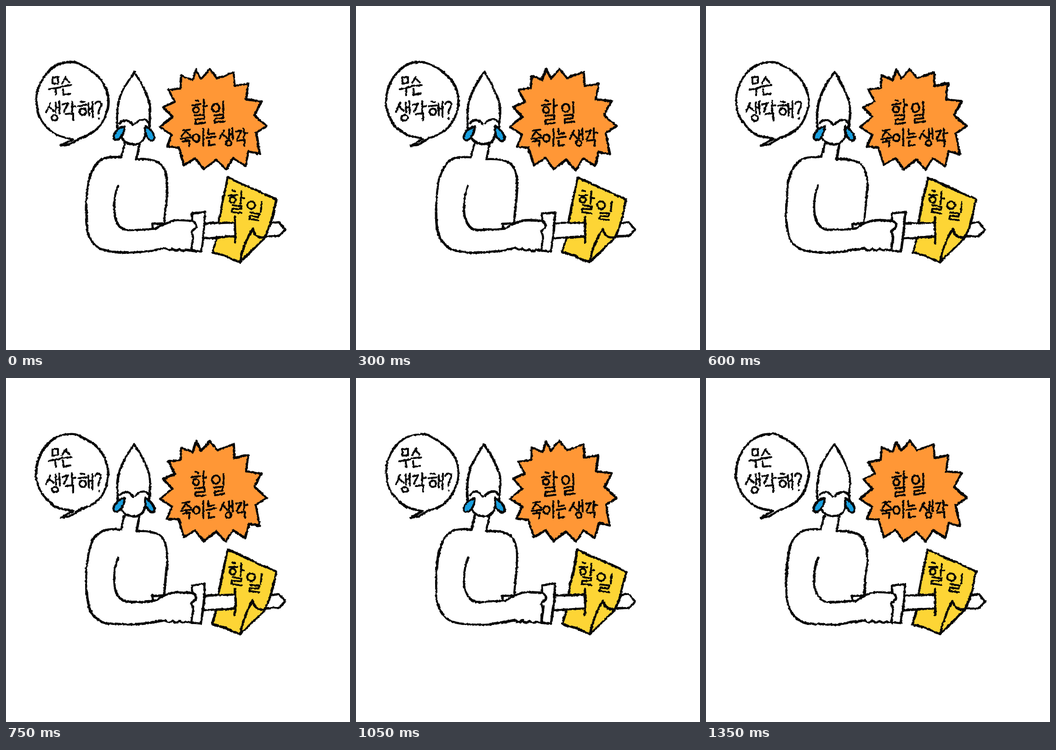
An HTML page for the animation above (1.5 s loop, 748x748 px).

```html
<!DOCTYPE html>
<html lang="ko">
<head>
<meta charset="utf-8">
<title>할 일 죽이는 생각</title>
<style>
  html, body { margin: 0; width: 100%; height: 100%; overflow: hidden; background: #fff; }
  svg { display: block; width: 100vw; height: 100vh; }
  path { stroke: #060606; stroke-linecap: round; stroke-linejoin: round; fill: none; }
</style>
</head>
<body>
<svg viewBox="0 0 748 748" role="img" aria-label="무슨 생각해? 할 일 죽이는 생각. 할 일">
  <filter id="crayon" filterUnits="userSpaceOnUse" x="0" y="0" width="748" height="748" color-interpolation-filters="sRGB">
    <feTurbulence id="sway" type="fractalNoise" baseFrequency="0.03" numOctaves="1" result="slow"/>
    <feTurbulence id="grit" type="fractalNoise" baseFrequency="0.25" numOctaves="1" result="fine"/>
    <feDisplacementMap in="SourceGraphic" in2="slow" scale="3.5" xChannelSelector="R" yChannelSelector="G" result="bent"/>
    <feDisplacementMap in="bent" in2="fine" scale="4" xChannelSelector="G" yChannelSelector="R"/>
    <feGaussianBlur stdDeviation="0.4"/>
  </filter>
  <g id="art" filter="url(#crayon)"></g>
</svg>
<script>
const STEP = 150, STEPS = 10;
const art = document.getElementById('art');
const sway = document.getElementById('sway');
const grit = document.getElementById('grit');
const pressed = [];

function add(d, style = {}) {
  const p = document.createElementNS('http://www.w3.org/2000/svg', 'path');
  p.setAttribute('d', d);
  Object.assign(p.style, { strokeWidth: 4.5, ...style });
  art.append(p);
  return p;
}

// An outline plus broken heavier strokes, like uneven hand pressure.
function ink(d, fill = 'none') {
  add(d, { fill });
  pressed.push(add(d, { strokeWidth: 5.5, strokeDasharray: '55 80 25 110 90 60' }));
}

const patch = (d, fill) => add(d, { fill, stroke: 'none' });
const letter = d => add(d, { strokeWidth: 4.1 });
const ring = (x, y, rx, ry = rx) =>
  `M${x} ${y - ry}a${rx} ${ry} 0 1 0 .1 0z`;

// Speech bubble
ink(`M139 122C112 122 92 138 80 157C68 177 63 200 67 222C71 248 90 270 112 281
  C124 286 136 287 146 289L119 304L137 301L160 287C190 278 205 264 214 245
  C224 224 225 205 220 187C213 160 190 140 165 129C157 123 148 121 139 122Z`, '#fff');

// Burst
const burst = [413,138, 424,158, 443,137, 459,157, 495,144, 497,174, 527,168, 522,203,
  556,207, 540,237, 567,261, 543,276, 552,322, 528,316, 520,348, 494,331, 478,356,
  457,334, 430,355, 412,331, 387,346, 375,308, 350,306, 361,280, 335,263, 362,241,
  342,220, 367,208, 353,182, 380,178, 382,151, 406,161];
ink(`M${burst.join(' ')}Z`, '#ff9736');

// Head
ink('M279 144C262 168 250 188 245 210C241 228 241 245 242 265');
ink('M279 144C295 167 305 188 311 208C315 226 313 245 311 264');
ink('M247 255C252 248 262 246 268 250L276 258');
ink('M281 256C286 248 300 244 306 249L312 256');
ink('M252 287C256 295 266 300 278 301C291 301 301 293 303 278');
ink('M258 262C248 263 237 271 234 283C233 291 240 294 247 288C254 281 258 272 258 262Z', '#189fdf');
ink('M303 261C301 272 304 283 312 290C319 296 324 291 323 284C320 274 312 266 303 261Z', '#189fdf');

// Neck and body
ink(`M258 299C256 310 254 318 250 329C235 328 220 328 209 333C192 343 183 360 179 385
  C175 410 173 440 175 470C177 500 188 522 210 530C235 538 270 537 300 534
  C320 531 335 529 346 526C352 532 358 532 362 527C367 533 372 533 377 528
  C383 533 388 533 391 530L404 532`);
ink('M290 300C288 312 286 322 284 333C305 332 325 335 336 343C349 355 351 375 350 400C349 425 345 450 344 472');
ink('M244 391C236 408 234 430 236 450C238 470 247 484 262 487C285 488 305 486 326 484C340 474 352 468 368 466C382 465 395 467 404 467');
ink('M343 473L318 474L319 483');

// Blade tip, note, blade
ink('M568 473L593 470L607 486L594 500L560 501', '#fff');
ink(`M482 373L588 421C582 448 576 470 572 483L562 505L509 557C495 552 488 550 482 546
  C476 541 467 542 459 538L449 535C452 523 458 511 459 497L462 470L471 425Z`, '#fdd535');
ink('M509 557C513 535 522 505 537 485C540 498 546 505 562 503');
patch('M432 473L498 471L498 501L430 505Z', '#fff');
ink('M433 473L497 471');
ink('M430 505L497 501');
ink('M498 459C497 480 500 497 498 515');

// Guard and hand edge
ink('M405 467L404 451L433 448L430 490L424 534L403 532');
ink('M405 467C412 470 415 477 412 482C408 486 402 488 403 492C408 499 407 508 405 515L403 532');

// Lettering: 무슨 생각해?
letter('M101 155L113 154L113 168L101 169ZM94 181L118 177M108 179L109 194');
letter('M130 154L122 168M130 158L138 166M120 175L142 172M124 181L125 193L140 191');
letter('M96 211L87 231M95 220L104 228M108 210L109 232M109 221L115 220M116 207L117 234' + ring(106, 243, 7, 6));
letter('M123 214L135 211L126 230M144 207L144 231M144 218L152 217M130 235L146 233L146 248');
letter('M163 208L171 209M158 218L175 216M179 212L180 238M180 224L187 223M188 208L188 242' + ring(167, 230, 7));
letter('M194 213C197 206 207 206 207 214C207 223 200 224 201 234M202 244L202.5 245');

// 할 일
letter('M412 205L418 207M404 216L423 213M430 203L430 233M430 217L437 216M411 239L431 237L431 246L412 248L412 257L433 254' + ring(413, 226, 6.5));
letter('M472 208L473 232M453 238L472 236L472 244L454 246L454 254L476 251' + ring(456, 221, 8, 9));

// 죽이는 생각
letter('M384 271L400 269M393 270L383 284M393 275L402 282M381 289L405 286M392 288L392 294M384 295L399 293L398 305');
letter('M429 267L429 304' + ring(414, 287, 7, 8));
letter('M440 267L440 279L453 277M436 287L456 284M441 293L441 304L453 302');
letter('M474 271L465 289M473 279L481 287M485 269L485 288M485 279L491 278M492 266L493 290' + ring(484, 298, 6));
letter('M500 273L511 271L502 289M517 267L517 287M517 277L525 276M503 293L519 291L519 304');

// 할일 on the note
letter('M492 401L498 403M485 411L503 411M512 403L510 430M511 417L518 418M493 433L512 436L511 442L492 441L491 448L512 451' + ring(493, 421, 6.5));
letter('M556 426L554 447M531 449L551 451L549 458L531 456L529 463L550 466' + ring(533, 433, 8.5, 8));

let shown = -1;
function draw() {
  const step = Math.floor(performance.now() / STEP) % STEPS;
  if (step !== shown) {
    shown = step;
    sway.setAttribute('seed', 11 + step * 7);
    grit.setAttribute('seed', 3 + step * 5);
    pressed.forEach((p, i) => {
      p.style.strokeDashoffset = (i * 73 + step * 131) % 420;
    });
  }
  requestAnimationFrame(draw);
}
draw();
</script>
</body>
</html>
```
